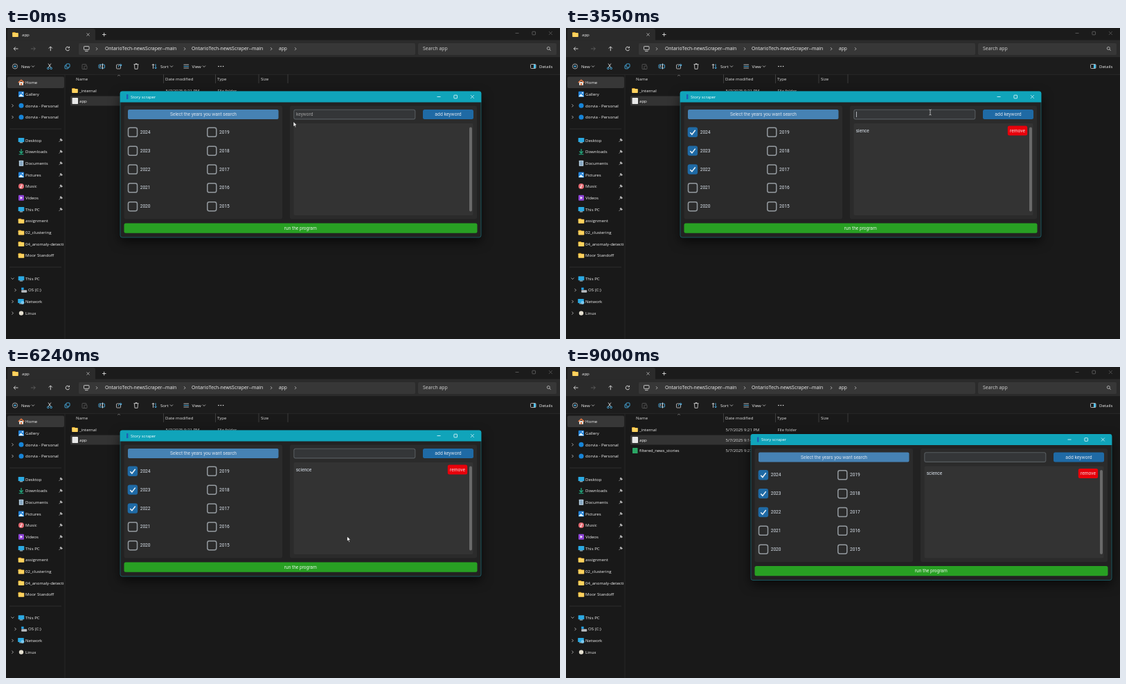
Write an HTML page with a canvas that moves like this. It is 800 by 450 pixels and loops after 9.03 s.

```html
<!DOCTYPE html>
<html lang="en">
<head>
<meta charset="utf-8">
<title>Story scraper</title>
<style>
html, body { margin: 0; width: 100%; height: 100%; overflow: hidden; background: #191919; }
canvas { display: block; }
</style>
</head>
<body>
<canvas id="stage" width="800" height="450"></canvas>
<script>
const c = document.getElementById('stage').getContext('2d');
const LOOP = 9030;
const UI = '"Open Sans", sans-serif', APP = 'Roboto, sans-serif';
const WHITE = '#f2f2f2', BLUE = '#4cc2ff', SOFT = '#dce4ee';

// Drawing helpers
function rect(x, y, w, h, fill, r = 0, line, lw = 1) {
  c.beginPath();
  c.roundRect(x, y, w, h, r);
  if (fill) { c.fillStyle = fill; c.fill(); }
  if (line) { c.strokeStyle = line; c.lineWidth = lw; c.stroke(); }
}
function text(s, x, y, size = 6.1, color = WHITE, font = UI, align = 'left') {
  c.font = size + 'px ' + font;
  c.textAlign = align;
  c.textBaseline = 'alphabetic';
  c.fillStyle = color;
  c.fillText(s, x, y + size * 0.36);
}
function path(points, color = WHITE, lw = 0.8, fill) {
  c.beginPath();
  for (let i = 0; i < points.length; i += 2) c.lineTo(points[i], points[i + 1]);
  if (fill) { c.closePath(); c.fillStyle = fill; c.fill(); }
  if (color) { c.strokeStyle = color; c.lineWidth = lw; c.stroke(); }
}
function disc(x, y, r, fill, line, lw = 0.8) {
  c.beginPath();
  c.arc(x, y, r, 0, 7);
  if (fill) { c.fillStyle = fill; c.fill(); }
  if (line) { c.strokeStyle = line; c.lineWidth = lw; c.stroke(); }
}
function chevron(x, y, down, color = '#c8c8c8') {
  path(down ? [x - 2, y - 1, x, y + 1, x + 2, y - 1] : [x - 1, y - 2, x + 1, y, x - 1, y + 2], color);
}
function cross(x, y, r, color = WHITE) {
  path([x - r, y - r, x + r, y + r], color, 0.7);
  path([x - r, y + r, x + r, y - r], color, 0.7);
}
function windowButtons(x, y, gap, color) {
  path([x - 2.5, y, x + 2.5, y], color, 0.8);
  rect(x + gap - 2.3, y - 2.3, 4.6, 4.6, null, 0.6, color, 0.8);
  cross(x + 2 * gap, y, 2.4, color);
}

const icons = {
  folder(x, y) {
    rect(x - 4.3, y - 3.4, 4.5, 3, '#d99a1c', 0.7);
    rect(x - 4.3, y - 2.4, 8.6, 6, '#ffd25e', 0.8);
  },
  home(x, y) {
    rect(x - 3, y - 1, 6, 4.8, '#e6e0da', 0.4);
    path([x - 4.2, y, x, y - 3.8, x + 4.2, y], '#ee7c45', 1.5);
    rect(x - 1, y + 1, 2, 2.8, '#d8703a');
  },
  picture(x, y) {
    rect(x - 4, y - 4, 8, 8, '#2583d8', 1);
    path([x - 4, y + 3.6, x - 0.5, y - 0.4, x + 4, y + 3.6], null, 0, '#d9f0ff');
    disc(x + 1.8, y - 1.8, 0.9, '#fff');
  },
  cloud(x, y) { disc(x, y, 3.5, '#1685d9'); },
  monitor(x, y) {
    rect(x - 4.3, y - 3.4, 8.6, 6, '#2ba9e2', 0.6);
    rect(x - 2.2, y + 2.9, 4.4, 1, '#b8dfef');
  },
  download(x, y) {
    path([x, y - 4, x, y + 2], '#25b889', 1.2);
    path([x - 2.6, y - 0.6, x, y + 2, x + 2.6, y - 0.6], '#25b889', 1.2);
    path([x - 3.4, y + 3.7, x + 3.4, y + 3.7], '#25b889', 1);
  },
  document(x, y) {
    rect(x - 3.2, y - 4, 6.4, 8, '#b9d2e4', 0.6);
    for (const d of [-2, 0, 2]) path([x - 2, y + d, x + 2, y + d], '#426d91', 0.8);
  },
  music(x, y) {
    disc(x, y, 4, '#e56a72');
    path([x, y + 1.5, x, y - 2, x + 1.8, y - 1.4], '#fff', 0.8);
    disc(x - 0.7, y + 1.5, 1, '#fff');
  },
  video(x, y) {
    rect(x - 4, y - 4, 8, 8, '#8f45d6', 1);
    path([x - 1.3, y - 2, x + 2, y, x - 1.3, y + 2], null, 0, '#fff');
  },
  drive(x, y) {
    rect(x - 3.8, y, 8, 3.4, '#b9bdc2', 0.7);
    rect(x - 3.8, y - 3.6, 3.4, 3.2, '#25a5ee');
  },
  network(x, y) {
    icons.monitor(x - 0.5, y - 0.5);
    disc(x + 2, y + 1.5, 2.4, '#7cc9ef');
  },
  linux(x, y) { disc(x, y, 3.2, '#e4dfd0'); }
};

// [row, icon, label, mark]: mark is a pin or an expander
const SIDEBAR = [
  [0, 'home', 'Home'], [1, 'picture', 'Gallery'],
  [2, 'cloud', 'dorvia - Personal', 'closed'], [3, 'cloud', 'dorvia - Personal', 'closed'],
  [5, 'monitor', 'Desktop', 'pin'], [6, 'download', 'Downloads', 'pin'],
  [7, 'document', 'Documents', 'pin'], [8, 'picture', 'Pictures', 'pin'],
  [9, 'music', 'Music', 'pin'], [10, 'video', 'Videos', 'pin'], [11, 'monitor', 'This PC', 'pin'],
  [12, 'folder', 'assignment'], [13, 'folder', '02_clustering'],
  [14, 'folder', '04_anomaly-detection'], [15, 'folder', 'Moor Standoff'],
  [17, 'monitor', 'This PC', 'open'], [18, 'drive', 'OS (C:)', 'closed'],
  [19, 'network', 'Network', 'closed'], [20, 'linux', 'Linux', 'closed']
];

function drawSidebar() {
  rect(2, 70.5, 82, 16.5, '#373737', 2);
  c.save();
  c.beginPath();
  c.rect(0, 67, 84, 383);
  c.clip();
  for (const [row, icon, label, mark] of SIDEBAR) {
    const y = 79 + row * 16.68, indent = label === 'OS (C:)' ? 4 : 0;
    icons[icon](22 + indent, y);
    text(label, 28 + indent, y);
    if (mark === 'pin') {
      path([79, y - 2.8, 82, y + 0.2, 79.9, y + 1.6, 77.5, y - 0.8], null, 0, '#b4b4b4');
      path([78.8, y + 0.2, 76.6, y + 2.4], '#b4b4b4', 0.8);
    } else if (mark) chevron(9.5 + indent, y, mark === 'open');
  }
  c.restore();
  path([5, 146, 80, 146], '#333', 0.8);
  path([5, 346, 80, 346], '#333', 0.8);
  path([85, 67, 85, 450], '#2c2c2c', 0.8);
}

function drawToolbar() {
  const y = 55.5;
  disc(13, y, 3.6, null, '#d8d8d8', 0.7);
  path([11, y, 15, y], BLUE); path([13, y - 2, 13, y + 2], BLUE);
  text('New', 22, y); chevron(39, y, true);
  path([61, y - 4, 65, y + 2], '#e4e4e4'); path([65, y - 4, 61, y + 2], '#e4e4e4');
  disc(60.8, y + 2.9, 1.3, null, BLUE); disc(65.2, y + 2.9, 1.3, null, BLUE);
  rect(85, y - 1.6, 5, 5, null, 1, BLUE, 0.8);
  rect(87, y - 3.6, 5, 5, '#1c1c1c', 1, BLUE, 0.8);
  rect(110, y - 3, 6, 7, null, 0.8, '#5c5c5c', 0.8);
  rect(113, y - 0.5, 4, 4.5, '#1c1c1c', 0.6, '#5c5c5c', 0.8);
  rect(134, y - 2.5, 8.5, 5, null, 1, BLUE, 0.8);
  path([139.5, y - 4, 139.5, y + 4], WHITE, 0.9);
  text('A', 135, y, 4.5);
  rect(159.5, y - 2.5, 6, 6, null, 1, '#cfcfcf', 0.8);
  path([162, y + 1, 163.5, y - 1.8, 167, y - 1.8], BLUE);
  path([165.3, y - 3.6, 167.2, y - 1.8, 165.3, y], BLUE);
  path([184.5, y - 2.8, 191.5, y - 2.8], '#dedede');
  path([185.4, y - 2.8, 186, y + 3.8, 190, y + 3.8, 190.6, y - 2.8], '#dedede');
  rect(187, y - 4, 2, 1, null, 0, '#dedede', 0.6);
  path([212.5, y + 3.4, 212.5, y - 3.2], WHITE);
  path([210.8, y - 1.6, 212.5, y - 3.4, 214.2, y - 1.6], WHITE);
  path([216, y - 3.4, 216, y + 3.2], BLUE);
  path([214.4, y + 1.6, 216, y + 3.4, 217.6, y + 1.6], BLUE);
  text('Sort', 223, y); chevron(239, y, true);
  for (const d of [-2.4, 0, 2.4]) path([256.5, y + d, 264, y + d], d ? '#dedede' : BLUE);
  text('View', 268.5, y); chevron(286, y, true);
  for (const x of [307, 310.3, 313.6]) disc(x, y, 0.8, WHITE);
  rect(757.5, y - 3, 7.5, 6, null, 1, '#d8d8d8', 0.8);
  rect(762, y - 2.5, 2.8, 5, BLUE);
  text('Details', 770, y);
}

function drawExplorer(hasResult) {
  rect(0, 0, 800, 450, '#191919');
  rect(0, 0, 800, 18, '#1b1b1b');
  rect(2, 1, 127, 20, '#2b2b2b', 3);
  rect(0, 17.5, 800, 25, '#2b2b2b');
  rect(0, 42.5, 800, 25, '#1c1c1c');
  path([0, 67.3, 800, 67.3], '#2b2b2b', 0.8);
  icons.folder(13.5, 9.5);
  text('app', 23, 9.5);
  cross(118.5, 9.5, 2, '#d8d8d8');
  path([139, 9.5, 144.5, 9.5]); path([141.7, 6.8, 141.7, 12.2]);
  windowButtons(738, 7.5, 24.2, '#666');

  path([17.5, 30, 11.3, 30]); path([13.8, 27.4, 11.2, 30, 13.8, 32.6]);
  path([36, 30, 42.2, 30], '#666'); path([39.7, 27.4, 42.3, 30, 39.7, 32.6], '#666');
  path([64.3, 33.2, 64.3, 27]); path([61.7, 29.5, 64.3, 26.9, 66.9, 29.5]);
  c.beginPath(); c.arc(89, 30, 2.8, 0.3, 5.3); c.strokeStyle = WHITE; c.lineWidth = 0.8; c.stroke();
  path([91.5, 26.8, 91.5, 28.8, 89.4, 28.8]);
  rect(105, 22, 486, 17, '#373737', 2);
  rect(595, 22, 200, 17, '#373737', 2);
  rect(112.5, 26.5, 7.5, 5, null, 0.8, '#e4e4e4', 0.8);
  path([114, 33.6, 118.5, 33.6], '#e4e4e4');
  for (const x of [131, 258, 383, 418]) chevron(x, 30.2);
  text('OntarioTech-newsScraper--main', 143, 30, 6.9);
  text('OntarioTech-newsScraper--main', 268, 30, 6.9);
  text('app', 394, 30, 6.6);
  text('Search app', 602, 30, 6.9, '#d4d4d4');
  disc(783.3, 29.4, 2, null, '#d8d8d8', 0.7);
  path([784.8, 30.9, 786.6, 32.7], '#d8d8d8');
  drawToolbar();
  drawSidebar();

  for (const [s, x] of [['Name', 101], ['Date modified', 230], ['Type', 305], ['Size', 368]])
    text(s, x, 74, 6.1, '#dedede');
  for (const x of [227.5, 302.5, 365, 407]) path([x, 67, x, 80], '#444', 0.8);
  path([161, 69.5, 163, 68, 165, 69.5], '#999', 0.6);
  rect(93, 98.5, 314, 14, '#333', 1.5);
  icons.folder(99.5, 90.5);
  text('_internal', 106, 90.5);
  text('5/7/2025 9:21 PM', 230.5, 90.5, 6, '#dedede');
  text('File folder', 305.5, 90.5, 6, '#dedede');
  rect(95.5, 101, 8.5, 9, '#e8e8e8', 0.8);
  text('app', 106, 106);
  text('5/7/2025 9:14 PM', 230.5, 106, 6, '#dedede');
  if (hasResult) {
    rect(96, 117, 7.5, 8, '#2aa765', 0.6);
    text('filtered_news_stories', 106, 121.3, 5.9);
    text('5/7/2025 9:27 PM', 230.5, 121.3, 6, '#dedede');
  }
}

function drawCheckbox(x, y, label, checked) {
  if (checked) {
    rect(x, y - 7.2, 14.4, 14.4, '#1f6aa5', 3);
    path([x + 3.6, y + 0.4, x + 6.2, y + 3.2, x + 11, y - 3], '#f0f4f8', 1.5);
  } else rect(x + 0.8, y - 6.5, 13, 13, null, 2.6, '#949a9f', 1.5);
  text(label, x + 18, y - 0.3, 6.6, SOFT, APP);
}

function drawApp(s) {
  c.save();
  c.translate(s.dx, s.dy);
  c.save();
  c.shadowColor = 'rgba(0,0,0,.65)';
  c.shadowBlur = 16;
  c.shadowOffsetY = 6;
  rect(165, 92, 521, 211, '#222', 3);
  c.restore();
  rect(165, 92, 521, 211, null, 3, '#1a6670', 0.8);
  rect(164.7, 91.5, 521.6, 16, '#10a4ba', [3, 3, 0, 0]);
  rect(174, 96, 2.4, 7, '#1f5fb4');
  text('Story scraper', 180, 99.6, 5.9, '#f8ffff');
  windowButtons(625, 99.5, 24.2, '#effcff');

  rect(170.5, 112.5, 228.5, 164, '#2b2b2b', 3);
  rect(410, 112.5, 270, 164, '#2b2b2b', 3);
  rect(176, 118, 217.5, 14, '#4682b4', 2);
  text('Select the years you want search', 285, 125, 6.6, SOFT, APP, 'center');
  for (let i = 0; i < 10; i++) {
    const right = i > 4;
    drawCheckbox(right ? 290 : 175.7, 150.8 + 26.85 * (i % 5), String(2024 - i), i < s.checks);
  }

  rect(415.8, 118.3, 175, 13.6, '#343638', 2.5, '#565b5e', 1.1);
  if (s.typed) text(s.typed, 419, 125, 6.6, SOFT, APP);
  else if (!s.focused) text('keyword', 419, 125, 6.6, '#9e9e9e', APP);
  if (s.caret) path([419.5, 121, 419.5, 129], '#e4e8ec', 0.7);
  rect(602, 118, 73, 14, s.hover ? '#144870' : '#1f6aa5', 2.5);
  text('add keyword', 638.5, 125, 6.8, SOFT, APP, 'center');

  rect(415.5, 138, 259, 133, '#333', 2);
  rect(669, 143.5, 4, 122, '#696969', 2);
  s.keywords.forEach((word, i) => {
    const y = 148.5 + i * 14.4;
    text(word, 418.7, y, 6.6, SOFT, APP);
    rect(637.8, y - 7, 28.4, 14, '#e8000b', 2.5);
    text('remove', 652, y, 6.6, '#f6dede', APP, 'center');
  });
  rect(170.5, 282.5, 510, 14.3, '#28a023', 2.5);
  text('run the program', 425.3, 289.5, 6.6, '#e2f2e2', APP, 'center');
  c.restore();
}

function drawPointer(x, y, kind) {
  c.save();
  c.translate(x, y);
  c.lineJoin = 'round';
  if (kind === 'beam') {
    path([-1.6, -4, 0, -3.4, 1.6, -4], '#ddd', 0.7);
    path([0, -3.5, 0, 3.5], '#ddd', 0.7);
    path([-1.6, 4, 0, 3.4, 1.6, 4], '#ddd', 0.7);
  } else if (kind === 'hand') {
    path([-1, 0, 0, -0.6, 1, 0, 1, 3, 4.4, 3.9, 4.6, 6, 3.4, 9, -0.8, 9, -3, 5.6, -2.4, 4.8, -1, 5.8],
      '#111', 0.8, '#fff');
  } else {
    path([0, 0, 0, 7.2, 1.7, 5.7, 2.9, 8.4, 4.1, 7.9, 2.9, 5.3, 5.2, 5.2], '#111', 0.6, '#fff');
  }
  c.restore();
}

// Pointer stops: time, x, y
const DRAG_START = 7400, DRAG_END = 7880;
const STOPS = [
  [0, 415, 135.5], [320, 184, 151], [430, 184, 151], [610, 184, 178], [700, 184, 178],
  [880, 184, 205], [1000, 184, 205], [1450, 492, 123], [2350, 492, 123], [2650, 626, 126],
  [2850, 626, 126], [3250, 526, 122], [4200, 526, 122], [4480, 624, 127], [4750, 624, 127],
  [5000, 653, 147], [5250, 653, 147], [5520, 508, 262], [5900, 492.5, 245], [6270, 492.5, 245],
  [6520, 440, 289], [6750, 440, 289], [7150, 381, 104], [DRAG_START, 381, 104],
  [DRAG_END, 483, 109.5], [8050, 483, 109.5], [8790, 560, 390], [8960, 590, 460], [LOOP, 590, 460]
];
const ease = p => p * p * (3 - 2 * p);
const ramp = (t, a, b) => Math.min(1, Math.max(0, (t - a) / (b - a)));

function pointerAt(t) {
  const i = STOPS.findIndex(stop => stop[0] > t);
  const [t0, x0, y0] = STOPS[i - 1], [t1, x1, y1] = STOPS[i];
  const p = ease(ramp(t, t0, t1));
  return [x0 + (x1 - x0) * p, y0 + (y1 - y0) * p];
}
function typing(word, t, start, end) {
  return word.slice(0, Math.floor(ramp(t, start, end) * word.length));
}

function stateAt(t) {
  const [x, y] = pointerAt(t);
  const drag = ease(ramp(t, DRAG_START, DRAG_END));
  const dx = 102 * drag, dy = 5.5 * drag;
  const inside = (l, top, w, h) => x - dx >= l && x - dx <= l + w && y - dy >= top && y - dy <= top + h;
  const keywords = [];
  if (t >= 2750 && t < 5150) keywords.push('sience');
  if (t >= 4570) keywords.push('science');
  const typed = t < 2750 ? typing('sience', t, 1550, 2220)
    : t < 4570 ? typing('science', t, 3620, 4180) : '';
  const hover = inside(602, 118, 73, 14);
  const clickable = hover || inside(170, 282, 510, 15) || inside(176, 143, 34, 122)
    || (keywords.length && inside(638, 141, 28, 14 * keywords.length));
  const clicked = t > 3280 && t < 3620;
  return {
    x, y, dx, dy, keywords, typed, hover,
    checks: [380, 660, 940].filter(at => t >= at).length,
    focused: t >= 1480,
    caret: t >= 1480 && !typed && (clicked || (t - 30) % 900 < 600),
    pointer: inside(416, 118, 175, 14) ? 'beam' : clickable ? 'hand' : 'arrow'
  };
}

function frame() {
  const t = performance.now() % LOOP;
  const s = stateAt(t);
  drawExplorer(t >= 6900);
  drawApp(s);
  if (t > 7480 && t < 7900) rect(253, -6, 294, 11.3, '#252525', 3, '#454545', 0.8);
  drawPointer(s.x, s.y, s.pointer);
  requestAnimationFrame(frame);
}
requestAnimationFrame(frame);
</script>
</body>
</html>
```
